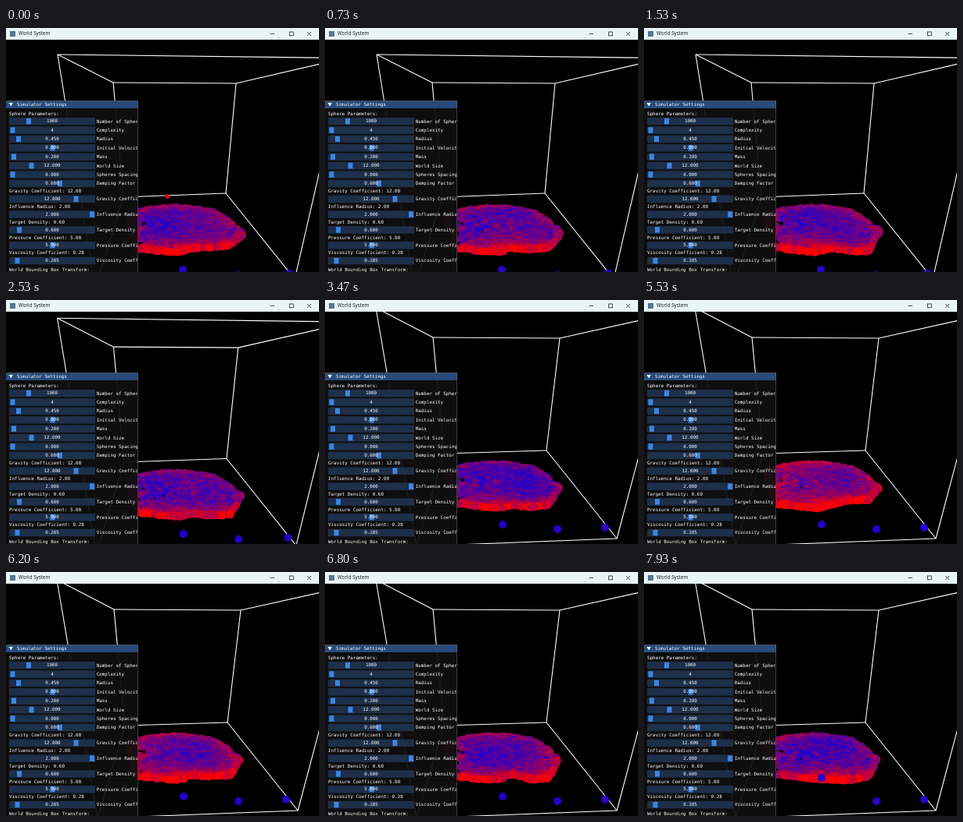
An HTML page with a canvas for the animation above (8000 ms loop, 400 by 313 pixels).

```html
<!DOCTYPE html>
<html lang="en">
<head>
<meta charset="utf-8">
<title>World System</title>
<style>
html, body { margin: 0; width: 100%; height: 100%; overflow: hidden; background: #000; }
canvas { display: block; width: 400px; height: 313px; }
</style>
</head>
<body>
<canvas id="stage" width="400" height="313"></canvas>
<script>
const ctx = document.getElementById('stage').getContext('2d');
const LOOP = 8000;
const MONO = '5.9px "DejaVu Sans Mono", monospace';
const SANS = '6.3px "Open Sans", sans-serif';

const clamp = (v, lo = 0, hi = 1) => Math.min(hi, Math.max(lo, v));
const mix = (a, b, k) => a + (b - a) * k;
const smooth = k => k * k * (3 - 2 * k);
const mixLists = (a, b, k) => a.map((v, i) => mix(v, b[i], k));

let seed = 41;
function random() {
  seed = (seed * 16807) % 2147483647;
  return seed / 2147483647;
}

// Room corners: back TL, TR, BR, BL, then front TL, TR, BR, BL, as seen by the two camera poses.
const HIGH_VIEW = [137, 70, 294, 71, 281, 212, 150, 217, 66, 34, 434, 38.5, 369, 322, 114, 334];
const LOW_VIEW = [138, 48, 300, 49, 283, 193, 152, 197, 65, 10, 450, 15.5, 373, 306, 117, 316];
const EDGES = [[0, 1], [1, 2], [2, 3], [3, 0], [4, 5], [5, 6], [6, 7], [7, 4], [0, 4], [1, 5], [2, 6], [3, 7]];

// Time, right tip x and y, lower rim heights from right to left, added redness.
const FLUID_KEYS = [
  [0, 309, 250, 264, 267, 268, 273, 272, 268, 0.02],
  [1530, 308, 245, 272, 272, 268, 273, 271, 267, 0.02],
  [3470, 306, 244, 268, 271, 269, 272, 270, 266, -0.05],
  [4670, 305, 246, 270, 262, 264, 270, 270, 266, 0.05],
  [5530, 307, 246, 262, 262, 268, 273, 270, 267, 0.13],
  [6800, 303, 246, 270, 272, 265, 272, 271, 268, 0.02],
  [7930, 305, 245, 268, 273, 272, 271, 268, 265, -0.02]
];
const UPPER_RIM = [[150, 215], [175, 208], [205, 205], [240, 206], [270, 211], [292, 224]];
const LOWER_RIM_X = [293, 270, 245, 215, 190, 160];
const CENTER = [228, 238];
const BALL = 4.7;

const particles = Array.from({ length: 950 }, (_, i) => {
  const onRim = i < 110;
  return {
    along: onRim ? i / 110 : random(),
    radius: onRim ? 0.97 : Math.sqrt(random()) * 0.97,
    phase: random() * 6.28,
    speed: 1.5 + random() * 3,
    tint: random() - 0.5
  };
});

function line(x1, y1, x2, y2) {
  ctx.beginPath();
  ctx.moveTo(x1, y1);
  ctx.lineTo(x2, y2);
  ctx.stroke();
}

function ball(x, y, r, red) {
  ctx.fillStyle = `rgb(${255 * red}, 0, ${235 * (1 - red)})`;
  ctx.beginPath();
  ctx.arc(x, y, r, 0, 7);
  ctx.fill();
}

function text(string, x, y, align = 'left') {
  ctx.textAlign = align;
  ctx.fillText(string, x, y);
}

function rect(color, x, y, w, h) {
  ctx.fillStyle = color;
  ctx.fillRect(x, y, w, h);
}

function drawRoom(view) {
  const corners = mixLists(HIGH_VIEW, LOW_VIEW, view);
  ctx.strokeStyle = '#fff';
  ctx.lineWidth = 1.1;
  for (const [a, b] of EDGES) {
    line(corners[2 * a], corners[2 * a + 1], corners[2 * b], corners[2 * b + 1]);
  }
}

function fluidState(ms) {
  const next = FLUID_KEYS.findIndex(key => key[0] > ms);
  if (next < 0) return FLUID_KEYS[FLUID_KEYS.length - 1];
  const from = FLUID_KEYS[next - 1], to = FLUID_KEYS[next];
  return mixLists(from, to, smooth((ms - from[0]) / (to[0] - from[0])));
}

function drawFluid(ms, drop) {
  const [, tipX, tipY, ...rest] = fluidState(ms);
  const redness = rest.pop();
  const rim = [...UPPER_RIM, [tipX, tipY], ...LOWER_RIM_X.map((x, i) => [x, rest[i]])];
  const t = ms / 1000;

  const balls = particles.map(p => {
    const at = p.along * rim.length, i = Math.floor(at);
    const edge = mixLists(rim[i], rim[(i + 1) % rim.length], at - i);
    const [dx, dy] = edge.map((v, k) => {
      const offset = v - CENTER[k];
      return (offset - Math.sign(offset) * Math.min(BALL, Math.abs(offset))) * p.radius;
    });
    const wave = t * p.speed + p.phase;
    const front = clamp(dy / 32);
    const drift = Math.sin(dx / 22 + t * 1.7) * Math.cos(dy / 15 - t) * 0.08;
    const red = 0.31 + redness + p.tint * 0.34 + 0.07 * Math.sin(wave) + drift
      + 0.32 * p.radius ** 6 + 0.42 * front * front;
    return {
      x: CENTER[0] + dx + 1.1 * Math.cos(wave),
      y: CENTER[1] + dy + 0.8 * Math.sin(wave),
      red: clamp(red, 0.14, 1)
    };
  });
  balls.sort((a, b) => a.y - b.y);
  for (const b of balls) ball(b.x, b.y + drop, BALL, b.red);
}

function drawStrays(ms, view, drop) {
  const joined = smooth(clamp((ms - 7000) / 700));
  const strays = [[226, 310, 227, 288], [297, 317, 297, 294], [362, 315, 358, 292]];
  strays.forEach(([x1, y1, x2, y2], i) => {
    const rise = i === 0 ? joined * 24 : 0;
    ball(mix(x1, x2, view), mix(y1, y2, view) - rise, 5, 0.15 + 0.03 * Math.sin(ms / 600 + i));
  });
  const fall = ms / 500;
  if (fall < 1) ball(206, 196 + 14 * fall * fall + drop, 3, 0.85);
}

const SLIDERS = [
  // value, label, grab center
  ['1000', 'Number of Spher', 29],
  ['4', 'Complexity', 8.5],
  ['0.450', 'Radius', 16],
  ['0.000', 'Initial Velocit', 59.5],
  ['0.200', 'Mass', 10],
  ['12.000', 'World Size', 32.5],
  ['0.000', 'Spheres Spacing', 8.5],
  ['0.600', 'Damping Factor', 69],
  ['12.000', 'Gravity Coeffic', 89.5, 'Gravity Coefficient: 12.00'],
  ['2.000', 'Influence Radiu', 110, 'Influence Radius: 2.00'],
  ['0.600', 'Target Density', 17, 'Target Density: 0.60'],
  ['5.000', 'Pressure Coeffi', 59.5, 'Pressure Coefficient: 5.00'],
  ['0.285', 'Viscosity Coeff', 14.5, 'Viscosity Coefficient: 0.28']
];

function drawPanel() {
  ctx.save();
  ctx.beginPath();
  ctx.rect(0, 93, 169, 220);
  ctx.clip();
  rect('rgba(15, 15, 15, 0.94)', 0, 93, 169, 220);
  rect('#294a7a', 0, 93.5, 169, 9.5);
  ctx.font = MONO;
  ctx.textBaseline = 'middle';
  ctx.fillStyle = '#fff';
  ctx.beginPath();
  ctx.moveTo(3.5, 96);
  ctx.lineTo(9, 96);
  ctx.lineTo(6.25, 100.5);
  ctx.fill();
  text('Simulator Settings', 14, 98.3);
  text('Sphere Parameters:', 4, 110);

  SLIDERS.forEach(([value, label, grab, heading], i) => {
    const y = i < 8 ? 119.7 + i * 11.4 : 219.4 + (i - 8) * 19.8;
    rect('#1d2f49', 4, y - 4.8, 110, 9.5);
    rect('#3d85e0', grab - 3, y - 3.8, 6, 7.5);
    ctx.fillStyle = '#fff';
    text(value, 59, y, 'center');
    text(label, 115.7, y + 0.3);
    if (heading) text(heading, 4, y - 9.8);
  });
  text('World Bounding Box Transform:', 4, 310);

  ctx.strokeStyle = 'rgba(110, 110, 128, 0.5)';
  ctx.lineWidth = 1;
  line(168.5, 93, 168.5, 313);
  line(0, 93.5, 169, 93.5);
  ctx.restore();
}

function drawTitleBar() {
  rect('#e6f6f4', 0, 0, 400, 15);
  rect('#56788f', 5, 4, 7, 7);
  ctx.fillStyle = '#111';
  ctx.font = SANS;
  ctx.textBaseline = 'middle';
  text('World System', 16, 7.8);
  ctx.strokeStyle = '#222';
  ctx.lineWidth = 0.8;
  line(337.5, 7.5, 343, 7.5);
  ctx.strokeRect(362.5, 5, 4.8, 4.8);
  line(385, 5, 390, 10);
  line(390, 5, 385, 10);
}

function draw(ms) {
  const view = smooth(clamp((ms - 1950) / 1250));
  const drop = mix(20, 0, view);
  rect('#000', 0, 0, 400, 313);
  drawRoom(view);
  drawFluid(ms, drop);
  drawStrays(ms, view, drop);
  drawPanel();
  drawTitleBar();
}

const start = performance.now();
function tick() {
  draw((performance.now() - start) % LOOP);
  requestAnimationFrame(tick);
}
tick();
</script>
</body>
</html>
```
